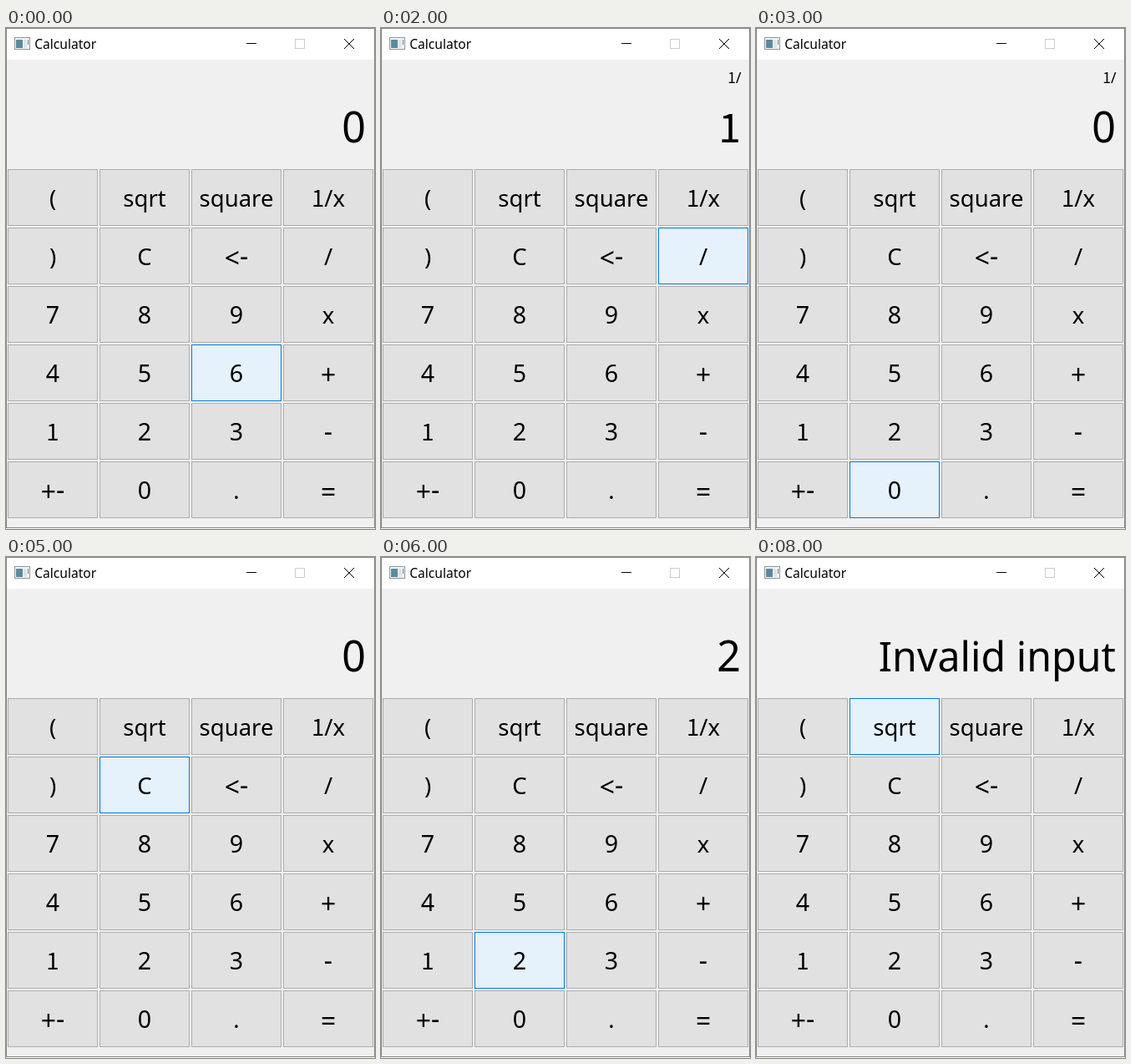
Write an HTML page that moves like this. It is 442 px wide and 600 px high and loops after 9 s.

```html
<!DOCTYPE html>
<html lang="en">
<head>
<meta charset="utf-8">
<title>Calculator</title>
<style>
  html, body { margin: 0; width: 100%; height: 100%; overflow: hidden; background: #fff; }
  svg { display: block; width: 442px; height: 600px; }
  text { font-family: "Noto Sans", "Open Sans", sans-serif; fill: #000; white-space: pre; }
  .one { font-family: "Noto Sans CJK SC", "Noto Sans CJK JP", "Noto Sans CJK", sans-serif; }
  .key rect { fill: #e1e1e1; stroke: #adadad; }
  .key.hot rect { fill: #e5f1fb; stroke: #0078d7; }
</style>
</head>
<body>
<svg id="stage" viewBox="0 0 442 600">
  <rect width="442" height="599" fill="#f0f0f0"/>
  <rect width="442" height="38" fill="#fff"/>
  <rect x=".5" y=".5" width="441" height="598" fill="none" stroke="#858585"/>
  <g id="icon">
    <rect x="10.5" y="11.5" width="18" height="14" fill="#f4f6f7" stroke="#8c969b"/>
    <rect x="12" y="14" width="8" height="10" fill="#5b8a9d"/>
    <rect x="21" y="14" width="4" height="10" fill="#dfe4e6"/>
    <rect x="26" y="14" width="1" height="6" fill="#6d7a80"/>
  </g>
  <g fill="none" stroke="#000">
    <path d="M288 18.5h12"/>
    <rect x="346.5" y="13.5" width="11" height="11" stroke="#ccc"/>
    <path d="M405 13l12 12M417 13l-12 12"/>
  </g>
</svg>
<script>
const SVG = "http://www.w3.org/2000/svg";
const stage = document.getElementById("stage");
const STEP = 1000;

const KEYS = [
  "(", "sqrt", "square", "1/x",
  ")", "C", "<-", "/",
  "7", "8", "9", "x",
  "4", "5", "6", "+",
  "1", "2", "3", "-",
  "+-", "0", ".", "="
];

// hovered key, history line, main display
const STEPS = [
  ["6", "", "0"],
  ["1", "", "1"],
  ["/", "1/", "1"],
  ["0", "1/", "0"],
  ["=", "", "Invalid input"],
  ["C", "", "0"],
  ["2", "", "2"],
  ["+-", "negate(2)", "-2"],
  ["sqrt", "", "Invalid input"]
];

// operator baseline drop in em
const DROP = { "+": 0.11, "=": 0.11, "<": 0.11, "-": 0.04 };

function add(parent, tag, attrs = {}) {
  const node = document.createElementNS(SVG, tag);
  for (const name in attrs) node.setAttribute(name, attrs[name]);
  return parent.appendChild(node);
}

function setText(node, str, size) {
  node.textContent = "";
  let drop = 0;
  for (const part of str.match(/[+=<-]|1|[02-9]+|[^+=<\d-]+/g) || []) {
    const isOp = part in DROP;
    const scale = isOp ? 1.16 : /[02-9]/.test(part) ? 1.04 : 1;
    const next = isOp ? DROP[part] * size : 0;
    const span = add(node, "tspan", { "font-size": size * scale, dy: next - drop });
    if (part === "1") span.setAttribute("class", "one");
    span.textContent = part;
    drop = next;
  }
}

function label(parent, x, y, anchor, str = "", size = 16) {
  const node = add(parent, "text", { x, y, "text-anchor": anchor });
  setText(node, str, size);
  return node;
}

label(stage, 34.2, 25, "start", "Calculator", 15.6);
const history = label(stage, 431.5, 66, "end");
const display = label(stage, 431, 137, "end");

const keys = KEYS.map((name, i) => {
  const x = 2 + (i % 4) * 110;
  const y = 169 + Math.floor(i / 4) * 70;
  const key = add(stage, "g", { class: "key" });
  add(key, "rect", { x: x + 0.5, y: y + 0.5, width: 107, height: 67 });
  label(key, x + 54, y + 45, "middle", name, 27.5);
  return key;
});

let shown = -1;
function draw(time) {
  const now = Math.floor(time / STEP) % STEPS.length;
  if (now === shown) return;
  shown = now;
  const [hot, past, value] = STEPS[now];
  keys.forEach((key, i) => key.classList.toggle("hot", KEYS[i] === hot));
  setText(history, past, 17.6);
  setText(display, value, 48.3);
}

const start = performance.now();
function tick() {
  draw(performance.now() - start);
  requestAnimationFrame(tick);
}
tick();
</script>
</body>
</html>
```
